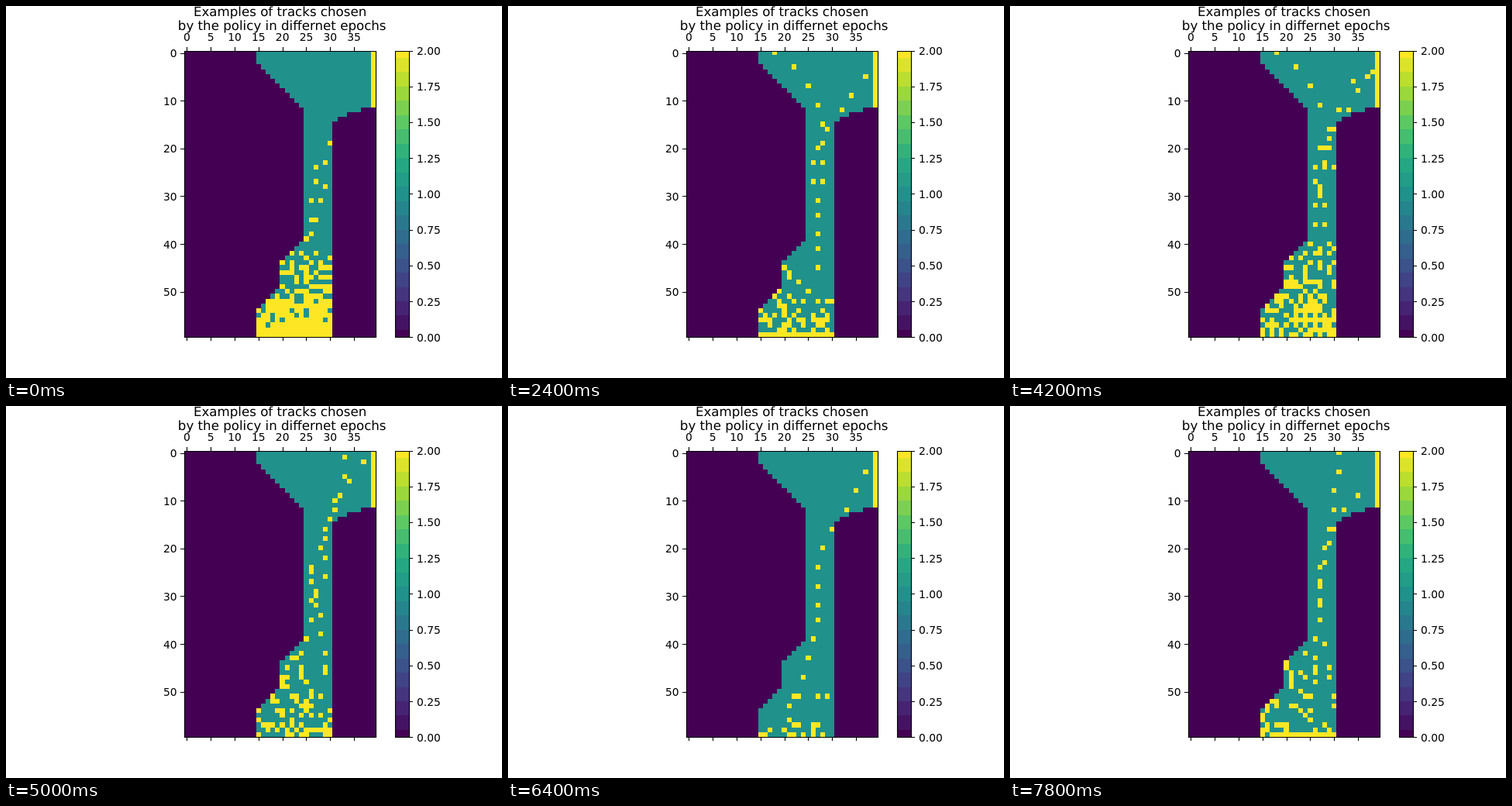
Write an HTML page that moves like this. It is 640 px wide and 480 px high and loops after 8 s.

```html
<!DOCTYPE html>
<html lang="en">
<head>
<meta charset="utf-8">
<title>Tracks by epoch</title>
<style>
  html, body { margin: 0; width: 100%; height: 100%; overflow: hidden; background: #fff; }
  svg { display: block; width: 640px; height: 480px; }
  text { font: 13.89px "DejaVu Sans", sans-serif; white-space: pre; }
  .title { font-size: 16.67px; text-anchor: middle; text-rendering: geometricPrecision; }
  .mid { text-anchor: middle; }
  .end { text-anchor: end; }
</style>
</head>
<body>
<svg id="stage" viewBox="0 0 640 480"></svg>
<script>
const COLS = 40, ROWS = 60, STEP = 200, STEPS = 40;
const WALL = '#440154', ROAD = '#21918c', MARK = '#fde725';
const stage = document.getElementById('stage');

function add(tag, attrs, text) {
  const el = document.createElementNS('http://www.w3.org/2000/svg', tag);
  for (const key in attrs) el.setAttribute(key, attrs[key]);
  if (text !== undefined) el.textContent = text;
  return stage.appendChild(el);
}

const clamp = (v, lo, hi) => Math.min(hi, Math.max(lo, v));
const lerp = (a, b, t) => a + (b - a) * t;
const id = (x, y) => y * COLS + x;

// Cell grid, snapped to whole pixels (halves go down)
const snap = v => Math.ceil(v - .5);
const edgeX = c => snap(230 + c * 247 / COLS);
const edgeY = r => Math.max(58, snap(57 + r * 370 / ROWS));
const cells = (x, y, w) =>
  `M${edgeX(x)} ${edgeY(y)}H${edgeX(x + w)}V${edgeY(y + 1)}H${edgeX(x)}Z`;

function roadLeft(y) {
  if (y < 40) return clamp(y + 13, 15, 25);
  return y < 50 ? Math.max(20, 64 - y) : Math.max(15, 69 - y);
}
function roadRight(y) {
  if (y < 12) return 40;
  return y < 15 ? [37, 34, 32][y - 12] : 31;
}

function hash(x, y, seed) {
  let h = Math.imul(x + 1, 374761393) ^ Math.imul(y + 1, 668265263) ^ Math.imul(seed + 1, 2246822519);
  h = Math.imul(h ^ h >>> 13, 1274126177);
  return ((h ^ h >>> 16) >>> 0) / 2 ** 32;
}

// A car moving at constant speed along a line of [x, y] points, marking where it lands
function lap(speed, ...points) {
  const hits = [];
  let i = 0;
  for (let y = points[0][1]; y <= points.at(-1)[1] + .3; y += speed) {
    while (i < points.length - 2 && y > points[i + 1][1]) i++;
    const [x0, y0] = points[i], [x1, y1] = points[i + 1];
    const x = lerp(x0, x1, clamp((y - y0) / (y1 - y0), 0, 1));
    hits.push(id(Math.round(x), Math.max(0, Math.round(y))));
  }
  return hits;
}

// Failed runs crowd towards the start line: density grows from `far` to `near`
function epoch(at, far, near, start, ...laps) {
  const set = new Set(laps.flat());
  for (let y = 40; y < ROWS; y++) {
    const density = y === ROWS - 1 ? start : lerp(far, near, (y - 40) / 18);
    for (let x = 15; x < 31; x++) if (hash(x, y, at) < density) set.add(id(x, y));
  }
  return { at, set };
}

const left = lap(4, [18, -1], [25, 7], [28, 15], [28, 27], [27, 31]);
const right = lap(3.65, [37, 5], [29, 16], [26, 23], [26, 27], [27, 30], [27, 47]);

const epochs = [
  epoch(0, .2, .98, 1,
    lap(4, [30, 19], [27, 27], [25, 39]),
    lap(3.6, [27, 24], [29, 28], [26, 39])),
  epoch(6, .2, .72, 1,
    lap(2.4, [35, 11], [30, 16]),
    lap(4, [29, 19], [27, 27], [27, 31], [25, 39])),
  epoch(12, .02, .3, .9, left, right),
  epoch(17, .25, .78, 1, left, right,
    lap(4, [30, 24], [28, 32], [28, 36])),
  epoch(25, .02, .4, .55,
    lap(4, [37, 2], [31, 10], [29, 18], [29, 26], [27, 30], [29, 42], [29, 46]),
    lap(3.75, [33, 1], [32, 9], [29, 16], [26, 24], [26, 35], [24, 42], [24, 47]),
    lap(3.5, [26, 25], [27, 29], [27, 32])),
  epoch(32, -.1, .18, .4,
    lap(3.93, [37, 4], [33, 12], [30, 16], [28, 20], [27, 24], [27, 35], [24, 47], [22, 51])),
  epoch(39, .12, .3, .9,
    lap(3.9, [31, 0], [30, 8], [30, 16], [28, 20], [27, 27], [27, 35], [26, 39]),
    lap(3.4, [35, 9], [32, 12], [29, 16], [29, 19]),
    lap(4, [27, 24], [27, 32]))
];

// Between two epochs every cell takes its value from one or the other,
// and one fresh lap is driven per step
function marksAt(step) {
  const next = Math.max(1, epochs.findIndex(e => e.at >= step));
  const a = epochs[next - 1], b = epochs[next];
  const t = (step - a.at) / (b.at - a.at);
  const first = 1 + Math.floor(hash(1, 2, step) * 4);
  const fresh = t > 0 && t < 1 ? lap(4, [38, first], [30, 16], [27, 28], [24, 51]) : [];
  let d = '';
  for (let y = 0; y < ROWS; y++) {
    for (let x = roadLeft(y); x < roadRight(y); x++) {
      const { set } = hash(x, y, 99) < t ? b : a;
      if (set.has(id(x, y)) || fresh.includes(id(x, y))) d += cells(x, y, 1);
    }
  }
  return d;
}

// Track
const crisp = { 'shape-rendering': 'crispEdges' };
add('rect', { x: 230, y: 58, width: 247, height: 369, fill: WALL, ...crisp });
let road = '', finish = '';
for (let y = 0; y < ROWS; y++) road += cells(roadLeft(y), y, roadRight(y) - roadLeft(y));
for (let y = 0; y < 12; y++) finish += cells(39, y, 1);
add('path', { d: road, fill: ROAD, ...crisp });
const marks = add('path', { fill: MARK, ...crisp });
add('path', { d: finish, fill: MARK, ...crisp });

// Colour bar
const ramp = [[68, 1, 84], [71, 45, 123], [59, 82, 139], [44, 114, 142], [33, 145, 140],
  [39, 173, 129], [92, 200, 99], [170, 220, 50], [253, 231, 37]];
function viridis(v) {
  const p = v * (ramp.length - 1), i = Math.min(ramp.length - 2, Math.floor(p));
  return `rgb(${ramp[i].map((c, k) => Math.round(lerp(c, ramp[i + 1][k], p - i)))})`;
}
const barY = v => Math.round(427.2 - 369.6 * clamp(v, 0, 1));
for (let i = 0; i <= 20; i++) {
  const top = barY((i + .5) / 20), bottom = barY((i - .5) / 20);
  add('rect', { x: 502, y: top, width: 18, height: bottom - top, fill: viridis(i / 20), ...crisp });
}

// Frames, ticks and labels
const line = v => Math.round(v) + .5;
const baseline = y => Math.round(y + 5.5);
let lines = 'M230.5 58.5H477.5V427.5H230.5ZM502.5 58.5H520.5V427.5H502.5Z';
for (let n = 0; n < COLS; n += 5) {
  const x = 230.4 + 6.16 * (n + .5);
  lines += `M${line(x)} 53V58M${line(x)} 428V432`;
  add('text', { x, y: 45, class: 'mid' }, n);
}
for (let n = 0; n < ROWS; n += 10) {
  const y = 57.6 + 6.16 * (n + .5);
  lines += `M225 ${line(y)}H230`;
  add('text', { x: 220.7, y: baseline(y), class: 'end' }, n);
}
for (let k = 0; k <= 8; k++) {
  const y = 427.2 - 46.2 * k;
  lines += `M521 ${line(y)}H525`;
  add('text', { x: 530, y: baseline(y) }, (k / 4).toFixed(2));
}
add('path', { d: lines, fill: 'none', stroke: '#000', 'stroke-width': 1.11 });
add('text', { x: 353.6, y: 13, class: 'title' }, 'Examples of tracks chosen');
add('text', { x: 356.2, y: 31, class: 'title' }, 'by the policy in differnet epochs');

let shown = -1;
function draw(now) {
  const step = Math.floor(now / STEP) % STEPS;
  if (step !== shown) marks.setAttribute('d', marksAt(shown = step));
}
const begin = performance.now();
function tick() {
  draw(performance.now() - begin);
  requestAnimationFrame(tick);
}
tick();
</script>
</body>
</html>
```
